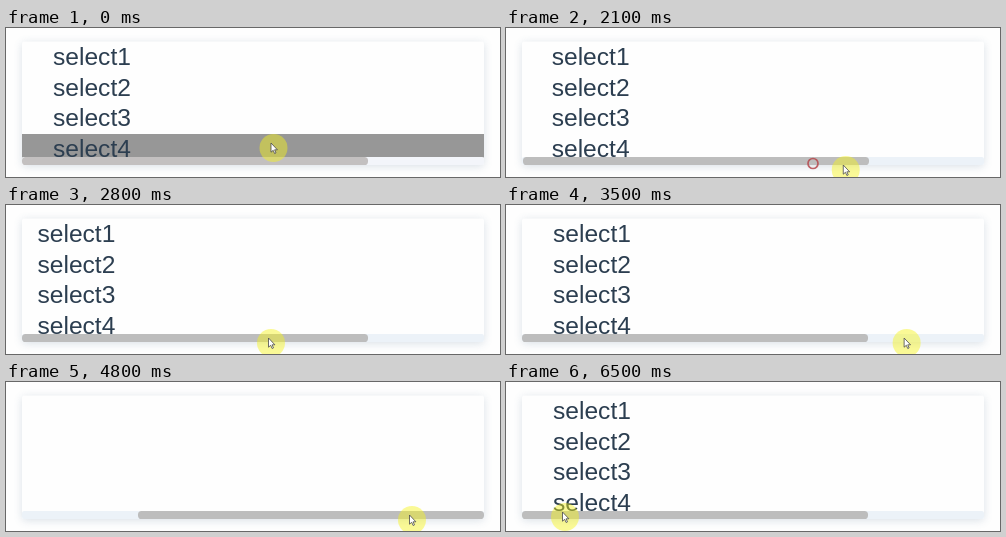
Write an HTML page that moves like this. It is 494 by 149 pixels and loops after 7400 ms.

```html
<!DOCTYPE html>
<html lang="en">
<head>
<meta charset="utf-8">
<title>Horizontal scroll list</title>
<style>
  html, body { margin: 0; width: 100%; height: 100%; overflow: hidden; background: #fefefe; }
  svg { display: block; width: 494px; height: 149px; }
  text { font: 24.6px "Liberation Sans", Arial, sans-serif; fill: #2c3e50; }
</style>
</head>
<body>
<svg viewBox="0 0 494 149">
  <defs>
    <filter id="blur" x="-10%" y="-30%" width="120%" height="160%">
      <feGaussianBlur stdDeviation="4.2"/>
    </filter>
    <clipPath id="view"><rect x="16" y="13.5" width="462" height="116"/></clipPath>
  </defs>
  <rect x="16" y="15" width="462" height="123.5" rx="3" fill="#5a7896" opacity=".22" filter="url(#blur)"/>
  <rect x="16" y="13.5" width="462" height="123.5" rx="2" fill="#fefefe"/>
  <g clip-path="url(#view)">
    <rect id="hover" x="16" y="106" width="462" height="31" fill="#979797"/>
    <g id="list"></g>
  </g>
  <rect id="track" x="16" y="129" width="462" height="8" rx="2"/>
  <rect id="thumb" x="16" y="129" width="346" height="8" rx="3.6"/>
  <circle id="ring" fill="none" stroke="#b5484c" stroke-width="1.7"/>
  <g id="pointer">
    <circle cx="2.5" cy="5" r="14" fill="#f7f418" fill-opacity=".45"/>
    <path d="M0 0V9.2L2.2 7.3L3.6 10.5L5 9.9L3.6 6.8H6.4Z" fill="#fff" stroke="#4a4a4a" stroke-width=".8" stroke-linejoin="round"/>
  </g>
</svg>
<script>
const LOOP = 7400, STEP = 100;
const BAR_TOP = 129, TRAVEL = 116, CONTENT_RATIO = 462 / 346;
const $ = id => document.getElementById(id);

const home = { x: 265, y: 115 };
const moves = [
  { from: 1300, to: 1400, x: 262, y: 123 },
  { from: 1400, to: 1800, x: 308, y: 136 },
  { from: 2000, to: 2300, x: 425, y: 140 },
  { from: 2300, to: 2800, x: 262.5, y: 133 },
  { from: 2800, to: 3600, x: 403.5, y: 133 },
  { from: 4900, to: 5400, x: 51.5, y: 132 },
  { from: 6200, to: 6500, x: 56.5, y: 130 }
];
const drag = { from: 2000, to: 2900, grabX: 307 };
const pageRight = 4400, pageLeft = 5420, PAGE_TIME = 400;
const presses = [drag.from, pageRight, pageLeft];

function ease(t, from, to) {
  const u = Math.min(1, Math.max(0, (t - from) / (to - from)));
  return (1 - Math.cos(Math.PI * u)) / 2;
}

function pointerAt(t) {
  return moves.reduce((p, m) => {
    const k = ease(t, m.from, m.to);
    return { x: p.x + (m.x - p.x) * k, y: p.y + (m.y - p.y) * k };
  }, home);
}

// The thumb trails the dragging pointer by one step.
function thumbOffset(t) {
  if (t >= drag.from && t < drag.to) {
    return Math.min(TRAVEL, Math.max(0, pointerAt(t - STEP).x - drag.grabX));
  }
  return TRAVEL * (ease(t, pageRight, pageRight + PAGE_TIME) - ease(t, pageLeft, pageLeft + PAGE_TIME));
}

function setAttributes(id, attributes) {
  for (const name in attributes) $(id).setAttribute(name, attributes[name]);
}

function show(id, visible) {
  $(id).style.display = visible ? "" : "none";
}

function buildList() {
  for (let i = 0; i < 4; i++) {
    const label = document.createElementNS("http://www.w3.org/2000/svg", "text");
    label.setAttribute("x", 47);
    label.setAttribute("y", 37 + i * 30.6);
    label.textContent = "select" + (i + 1);
    $("list").append(label);
  }
}

function render(t) {
  const tip = pointerAt(t);
  const overRow = tip.y < BAR_TOP;
  show("hover", overRow);
  setAttributes("track", { fill: overRow ? "#f3f5fa" : "#ecf2f8" });
  setAttributes("thumb", { fill: overRow ? "#c3c0c0" : "#bdbdbd", x: 16 + thumbOffset(t) });
  setAttributes("list", { transform: `translate(${-thumbOffset(t - STEP) * CONTENT_RATIO} 0)` });
  setAttributes("pointer", { transform: `translate(${tip.x} ${tip.y})` });

  const pressed = presses.find(p => t >= p && t < p + 300);
  show("ring", pressed);
  if (pressed) {
    const age = (t - pressed) / STEP;
    const { x, y } = pointerAt(pressed);
    setAttributes("ring", { cx: x - 1, cy: y - .5, r: 2.2 + 2.8 * age, opacity: 1 - .15 * age * age });
  }
}

buildList();
const start = performance.now();
function tick() {
  const t = (performance.now() - start) % LOOP;
  render(Math.floor(t / STEP) * STEP);
  requestAnimationFrame(tick);
}
tick();
</script>
</body>
</html>
```
